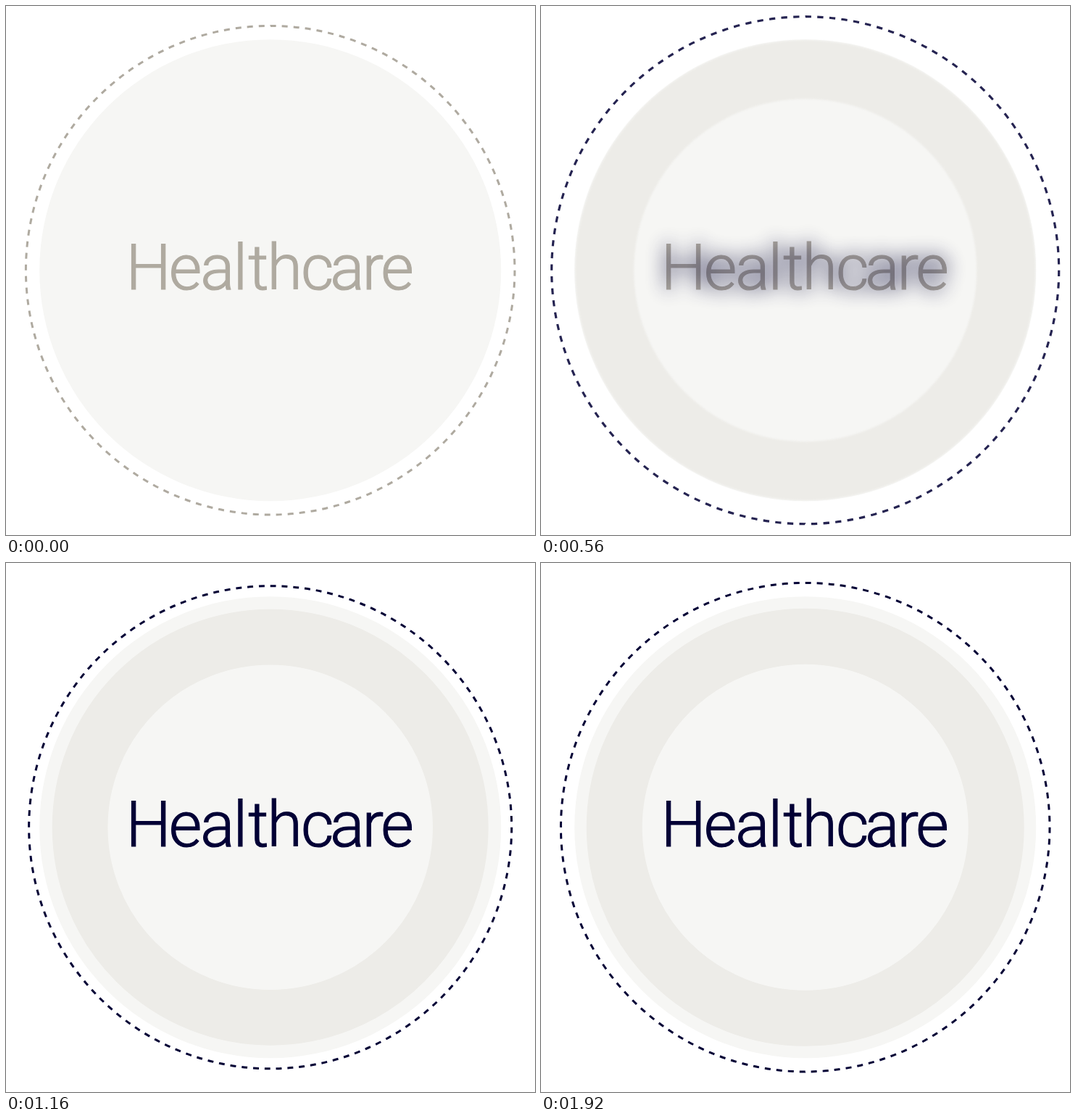
Animation, 730 px wide and 730 px high, one loop 1960 ms. Source, as an HTML page:

```html
<!DOCTYPE html>
<html lang="en">
<head>
<meta charset="utf-8">
<title>Healthcare</title>
<style>
  html, body { margin: 0; width: 100%; height: 100%; overflow: hidden; background: #fff; }
  svg { display: block; width: 100vw; height: 100vh; }
  circle { cx: 364.7px; cy: 364.7px; }
  .dashes { fill: none; stroke-dasharray: 1 1; }
  .band { fill: none; stroke: #edece8; }
  text {
    font: 300 88px Roboto, "Liberation Sans", sans-serif;
    letter-spacing: -2px;
    stroke-width: 1.1px;
  }
  .idle { fill: #afaaa0; stroke: #afaaa0; }
  .active { fill: #020035; stroke: #020035; }
</style>
</head>
<body>
<svg viewBox="0 0 730 730">
  <circle r="318.5" fill="#f6f6f4"/>
  <circle id="band" class="band"/>
  <circle id="idleDashes" class="dashes" r="337.3" pathLength="264" stroke="#afaaa0" stroke-width="3"/>
  <circle id="activeDashes" class="dashes" pathLength="264" stroke="#020035"/>
  <text id="idleText" class="idle" x="165.5" y="391" dx="0 -1 0 0 3 0 0 -3 -1 -1">Healthcare</text>
  <text id="activeText" class="active" x="165.5" y="391" dx="0 -1 0 0 3 0 0 -3 -1 -1">Healthcare</text>
</svg>
<script>
  const LOOP = 1960, STEP = 40, START = 200;
  const $ = id => document.getElementById(id);
  const clamp = v => Math.min(1, Math.max(0, v));
  const blur = px => px > 0.05 ? `blur(${px}px)` : 'none';
  const show = (id, opacity) => { $(id).style.opacity = opacity; };

  // Damped oscillation around 1; t counts in ms from the first upward crossing.
  const spring = (t, size, decay, rate) =>
    1 + size * Math.exp(-decay * t) * Math.sin(rate * t);
  const dashScale = t => spring(t - 284, 0.0985, 0.003, 0.0066);
  const bandScale = t => spring(t - 265, 0.1415, 0.0054, 0.0068);

  function draw(time) {
    const t = Math.floor(time / STEP) * STEP - START;
    const running = t > 0;
    const fade = clamp(t / 420);
    const textBlur = 16 * (1 - clamp(t / 920) ** 2);

    show('idleDashes', running ? 0 : 1);
    show('idleText', textBlur > 0 ? 1 : 0);
    show('activeDashes', fade);
    show('activeText', fade);
    show('band', clamp(t / 200));
    if (!running) return;

    const dashes = $('activeDashes');
    dashes.setAttribute('r', 337.3 * dashScale(t));
    dashes.setAttribute('stroke-width', 3 + 3 * Math.max(0, (370 - t) / 170));
    dashes.style.filter = blur(0.9 * (1 - clamp(t / 600)));

    const band = $('band'), scale = bandScale(t);
    band.setAttribute('r', 263.5 * scale);
    band.setAttribute('stroke-width', 77 * scale);
    band.style.filter = blur(3 * (1 - clamp(t / 500)));

    $('activeText').style.filter = blur(textBlur);
  }

  const origin = performance.now();
  function tick() {
    draw((performance.now() - origin) % LOOP);
    requestAnimationFrame(tick);
  }
  tick();
</script>
</body>
</html>
```
